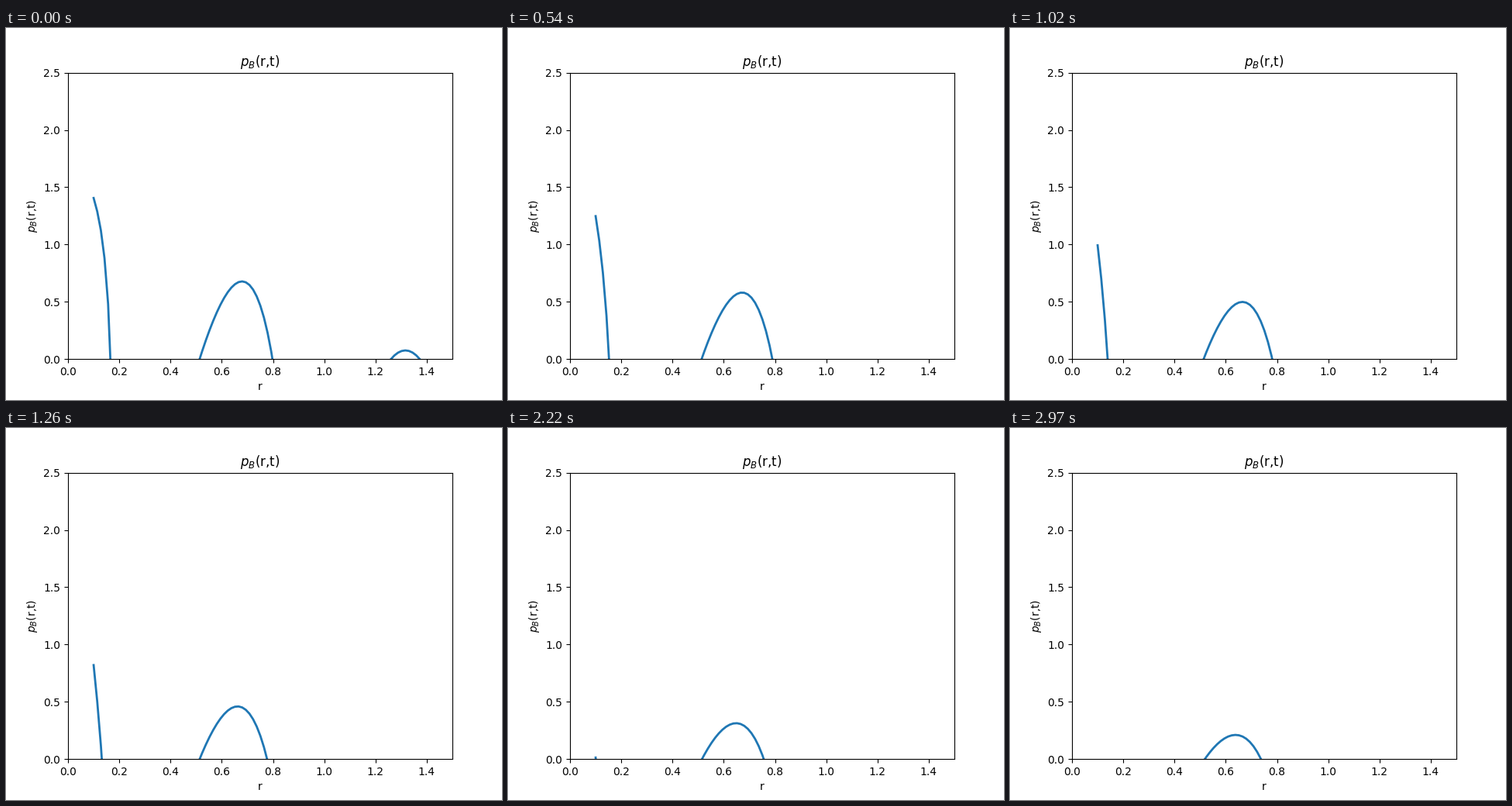
A matplotlib script that plays this animation: 640x480 px, repeating every 3 s.

```python
import numpy as np
import matplotlib.pyplot as plt
from matplotlib.animation import FuncAnimation

FRAMES = 100
r = np.linspace(0.1, 1.5, 100)


def inner(t):
    """Steep flank next to the inner radius."""
    zero = 0.1665 - 0.072 * t - 0.023 * t**2
    bend = 0.47 - 0.75 * t + 0.4 * t**2
    tip = 0.0473 - 0.031 * t + 0.011 * t**2 + 0.0409 * t**3
    soft = tip - bend * (zero - 0.1)
    u = zero - r
    return u / np.maximum(soft + bend * u, 0.3 * soft)


def middle(t):
    """Skewed arch between two zeros, with its top at fraction `top`."""
    left = 0.5135 + 0.005 * t**4
    right = 0.798 - 0.042 * t - 0.0195 * t**2
    height = 0.678 - 0.555 * t + 0.084 * t**2
    top = 0.582 - 0.055 * t + 0.02 * t**2
    skew = (2 * top - 1) / top**2

    def arch(s):
        return s * (1 - s) / np.maximum(1 - skew * s, 0.1)

    return height * arch((r - left) / (right - left)) / arch(top)


def outer(t):
    return 0.0757 - 0.545 * t - 24 * (r - 1.3165)**2


def pressure(t):
    return np.maximum.reduce([inner(t), middle(t), outer(t)])


fig, ax = plt.subplots(figsize=(6.4, 4.8), dpi=100)
ax.set(xlim=(0, 1.5), ylim=(0, 2.5), xlabel="r",
       ylabel="$p_B$(r,t)", title="$p_B$(r,t)")
line, = ax.plot(r, pressure(0), lw=2)


def update(i):
    line.set_ydata(pressure(i / FRAMES))
    return line,


anim = FuncAnimation(fig, update, frames=FRAMES, interval=30,
                     repeat=True, repeat_delay=0)
plt.show()
```
